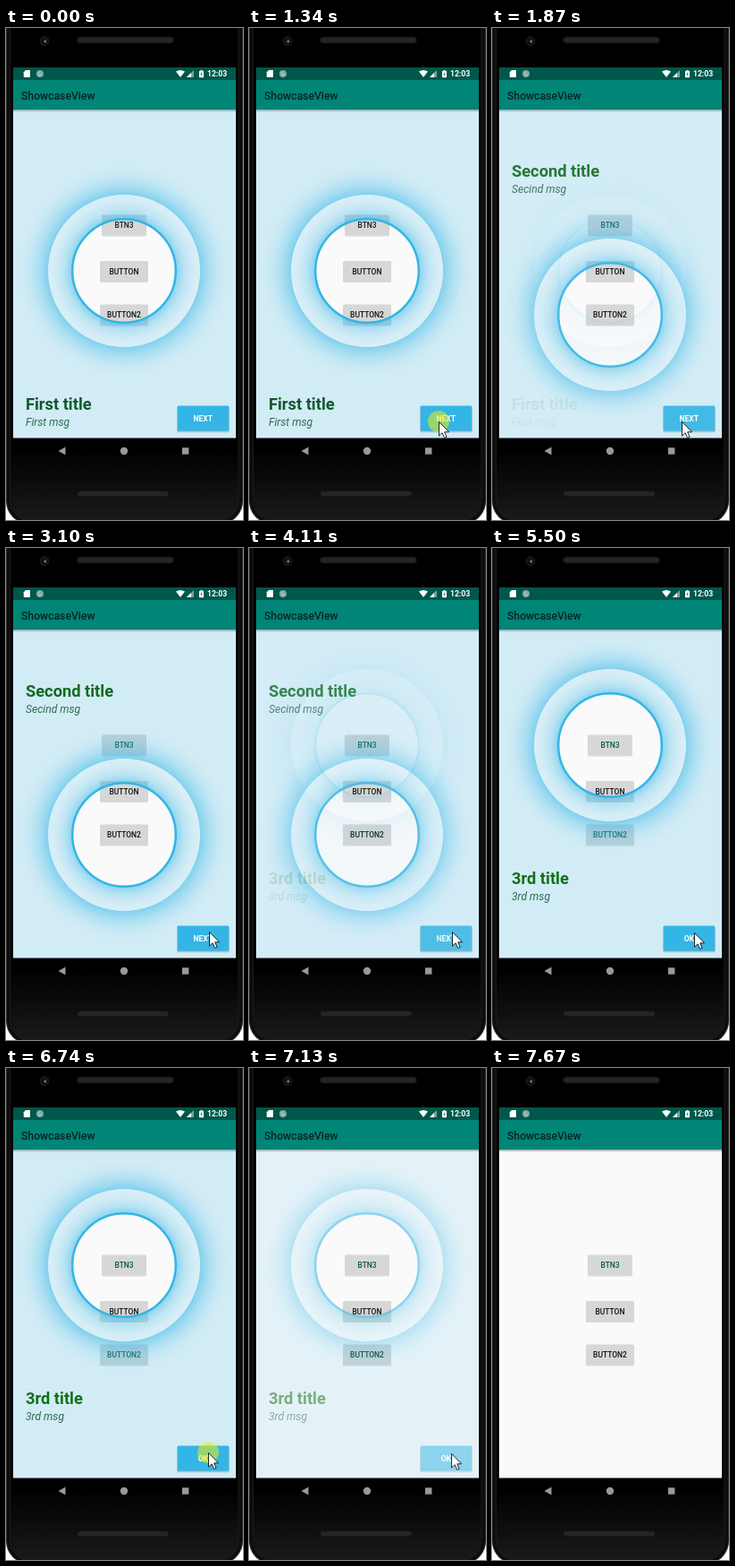
Recreate the animation shown at these times as an HTML page. Size 265x549 px, loop 8.75 s.

```html
<!DOCTYPE html>
<html lang="en">
<head>
<meta charset="utf-8">
<title>Showcase demo</title>
<style>
html, body { margin: 0; width: 100%; height: 100%; overflow: hidden; background: #fff; }
svg { display: block; width: 265px; height: 549px; font-family: Roboto, "Open Sans", sans-serif; }
.btn rect { fill: #d6d7d7; }
.btn text, .action text { font-size: 8.48px; font-weight: 500; text-anchor: middle; }
.btn text { fill: #101314; }
.title { font-size: 18.3px; font-weight: 700; }
.msg { font-size: 12.1px; font-style: italic; fill: #2f6a50; }
.action text { fill: #fff; font-weight: 700; }

.scene, .tap, #cursor, #b1 text, #b3 text { animation: 8750ms linear infinite; }
.scene { opacity: 0; }
#s1 { animation-name: s1; }
#s2 { animation-name: s2; }
#s3 { animation-name: s3; }
.tap { animation-name: tap; fill: #e6f014; }
#cursor { animation-name: move; }
#b1 text { animation-name: tintTop; }
#b3 text { animation-name: tintLow; }

@keyframes s1 {
  0% { opacity: 1; }
  17.49% { opacity: 1; animation-timing-function: cubic-bezier(.4, 0, .6, 1); }
  22.4%, 100% { opacity: 0; }
}
@keyframes s2 {
  0% { opacity: 0; }
  17.49% { opacity: 0; animation-timing-function: cubic-bezier(.4, 0, .6, 1); }
  22.4% { opacity: 1; }
  45.6% { opacity: 1; animation-timing-function: cubic-bezier(.4, 0, .6, 1); }
  50.5%, 100% { opacity: 0; }
}
@keyframes s3 {
  0% { opacity: 0; }
  45.6% { opacity: 0; animation-timing-function: cubic-bezier(.4, 0, .6, 1); }
  50.5% { opacity: 1; }
  79.2% { opacity: 1; animation-timing-function: cubic-bezier(.4, 0, .6, 1); }
  84.1%, 100% { opacity: 0; }
}
@keyframes tap {
  0%, 15.29% { opacity: 0; }
  15.3%, 16.2% { opacity: .56; }
  18.74%, 43.41% { opacity: 0; }
  43.42%, 44.3% { opacity: .56; }
  46.86%, 77% { opacity: 0; }
  77.01%, 77.9% { opacity: .56; }
  80.5%, 100% { opacity: 0; }
}
@keyframes move {
  0%, .5% { transform: translate(231px, 552px); animation-timing-function: ease-out; }
  7.09%, 8.2% { transform: translate(218px, 444px); }
  10.74%, 24.1% { transform: translate(212px, 439px); }
  27.54%, 29.3% { transform: translate(228.5px, 425px); }
  30.17%, 31.9% { transform: translate(230.5px, 423px); }
  32.8% { transform: translate(231px, 424px); }
  33.7%, 34.6% { transform: translate(229.5px, 426px); }
  35.42%, 48.6% { transform: translate(227px, 428px); }
  52.2% { transform: translate(227.5px, 455px); }
  53.03% { transform: translate(227.5px, 457px); }
  54.86%, 55.7% { transform: translate(227.5px, 461px); }
  59.5% { transform: translate(223.5px, 443px); }
  62.86%, 81.1% { transform: translate(226px, 429px); animation-timing-function: ease-in; }
  87.5%, 100% { transform: translate(229px, 552px); }
}
@keyframes tintTop {
  0%, 18.5% { fill: #14211f; }
  21.5%, 100% { fill: #0a5a36; }
}
@keyframes tintLow {
  0%, 46% { fill: #101314; }
  50%, 80% { fill: #125a38; }
  84%, 100% { fill: #101314; }
}
</style>
</head>
<body>
<svg viewBox="0 0 265 549">
  <defs>
    <radialGradient id="glow">
      <stop offset=".49" stop-color="#33b5e5" stop-opacity=".46"/>
      <stop offset=".54" stop-color="#33b5e5" stop-opacity=".26"/>
      <stop offset=".6" stop-color="#70cbed" stop-opacity=".14"/>
      <stop offset=".66" stop-color="#e0f4fb" stop-opacity=".14"/>
      <stop offset=".715" stop-color="#fff" stop-opacity=".16"/>
      <stop offset=".722" stop-color="#33b5e5" stop-opacity=".5"/>
      <stop offset=".8" stop-color="#33b5e5" stop-opacity=".26"/>
      <stop offset=".9" stop-color="#33b5e5" stop-opacity=".07"/>
      <stop offset="1" stop-color="#33b5e5" stop-opacity="0"/>
    </radialGradient>
    <linearGradient id="drop" x2="0" y2="1">
      <stop stop-color="#000" stop-opacity=".3"/>
      <stop offset="1" stop-color="#000" stop-opacity="0"/>
    </linearGradient>
    <linearGradient id="body" gradientUnits="userSpaceOnUse" x1="0" y1="470" x2="0" y2="549">
      <stop stop-color="#000"/>
      <stop offset="1" stop-color="#1a1a1a"/>
    </linearGradient>
  </defs>

  <!-- phone -->
  <rect x=".5" y="-100" width="264" height="653" rx="25" fill="#0c0c0c" stroke="#343434"/>
  <rect x="4.5" y="-100" width="255.5" height="650" rx="23" fill="url(#body)" stroke="#1c1c1c"/>
  <g fill="#242424" stroke="#0f0f0f">
    <rect x="79.5" y="10" width="108" height="7" rx="3.5"/>
    <rect x="79.5" y="516.5" width="103" height="6.5" rx="3.25"/>
  </g>
  <circle cx="43" cy="14.5" r="5" fill="#111213" stroke="#1d1d1f"/>
  <circle cx="43.8" cy="15" r="1.4" fill="#6f7c7b"/>

  <!-- app -->
  <rect x="8" y="58" width="249" height="399.5" fill="#fafafa"/>
  <rect x="8" y="44" width="249" height="14" fill="#00574b"/>
  <rect x="8" y="58" width="249" height="33.2" fill="#008577"/>
  <rect x="8" y="91.2" width="249" height="3" fill="url(#drop)"/>
  <text x="17" y="79.7" font-size="12.2" font-weight="500" fill="#0b2421">ShowcaseView</text>

  <!-- status bar -->
  <g fill="#fff">
    <path d="M22 47h5v8h-7.2v-5.8z"/>
    <path d="M190 48.6q5-3.4 10 0l-5 6.4z"/>
    <path d="M210 47v8h-8z" opacity=".45"/>
    <path d="M207 50v5h-5z"/>
    <path d="M216 48h1.4v-1h2.2v1h1.4v7.3h-5z"/>
    <text x="225" y="54.2" font-size="8.6" font-weight="700">12:03</text>
  </g>
  <path d="M218.9 49l-1.5 2.7h1l-.4 2.2 1.6-2.8h-1z" fill="#00574b"/>
  <circle cx="38" cy="51" r="4" fill="#7fa9a2"/>
  <path d="M35.8 49.4l4.4 3.6M36.2 52.4l2 1.6" stroke="#cfe0dd" stroke-width=".8"/>

  <g id="buttons"></g>
  <g id="scenes"></g>

  <!-- navigation bar -->
  <g fill="#949c9a">
    <path d="M58.5 472l8-4.4v8.8z"/>
    <circle cx="132" cy="472" r="4.2"/>
    <rect x="197" y="468.3" width="7.4" height="7.4"/>
  </g>

  <g id="cursor">
    <circle class="tap" r="12"/>
    <path d="M.5.5V16.2L4.1 12.8 6.6 18.4 9 17.4 6.7 11.8H11.5z" fill="#fff" stroke="#111" stroke-width=".9"/>
  </g>
</svg>
<script>
const buttons = [
  ["b1", 107, 50, 220, "BTN3"],
  ["b2", 105, 54, 271.5, "BUTTON"],
  ["b3", 105, 54, 320, "BUTTON2"],
];
const scenes = [
  { id: "s1", cy: 271, ty: 426, title: "First title", msg: "First msg", label: "NEXT", ink: "#10592c" },
  { id: "s2", cy: 320, ty: 166, title: "Second title", msg: "Secind msg", label: "NEXT", ink: "#126a22" },
  { id: "s3", cy: 220, ty: 375, title: "3rd title", msg: "3rd msg", label: "OK", ink: "#127019" },
];

const button = ([id, x, w, cy, label]) => `
  <g id="${id}" class="btn">
    <rect x="${x}" y="${cy - 10.6}" width="${w}" height="23" rx="1.5" style="fill:#000" opacity=".12"/>
    <rect x="${x}" y="${cy - 11.5}" width="${w}" height="23" rx="1.5"/>
    <text x="132" y="${cy + 3}">${label}</text>
  </g>`;

const scene = s => `
  <g id="${s.id}" class="scene">
    <path fill="#33b5e5" fill-opacity=".2" fill-rule="evenodd"
      d="M8 91.2H257V457.5H8ZM74 ${s.cy}a58 58 0 1 0 116 0a58 58 0 1 0-116 0"/>
    <circle cx="132" cy="${s.cy}" r="118" fill="none"/>
    <path fill="url(#glow)" fill-rule="evenodd"
      d="M14 ${s.cy}a118 118 0 1 0 236 0a118 118 0 1 0-236 0M74 ${s.cy}a58 58 0 1 0 116 0a58 58 0 1 0-116 0"/>
    <circle cx="132" cy="${s.cy}" r="57.8" fill="none" stroke="#33b5e5" stroke-width="2.5"/>
    <text class="title" x="22" y="${s.ty}" fill="${s.ink}">${s.title}</text>
    <text class="msg" x="22" y="${s.ty + 18}">${s.msg}</text>
    <g class="action">
      <rect x="191" y="422" width="59" height="29.5" rx="2" opacity=".1"/>
      <rect x="191.5" y="422" width="58" height="28.6" rx="1.5" opacity=".16"/>
      <rect x="191.8" y="421.4" width="57.2" height="28.2" rx="1" fill="#33b5e5"/>
      <text x="220.3" y="438.5">${s.label}</text>
    </g>
  </g>`.replace(/\s*<circle[^>]*r="118"[^>]*>/, "");

document.getElementById("buttons").innerHTML = buttons.map(button).join("");
document.getElementById("scenes").innerHTML = scenes.map(scene).join("");
</script>
</body>
</html>
```
